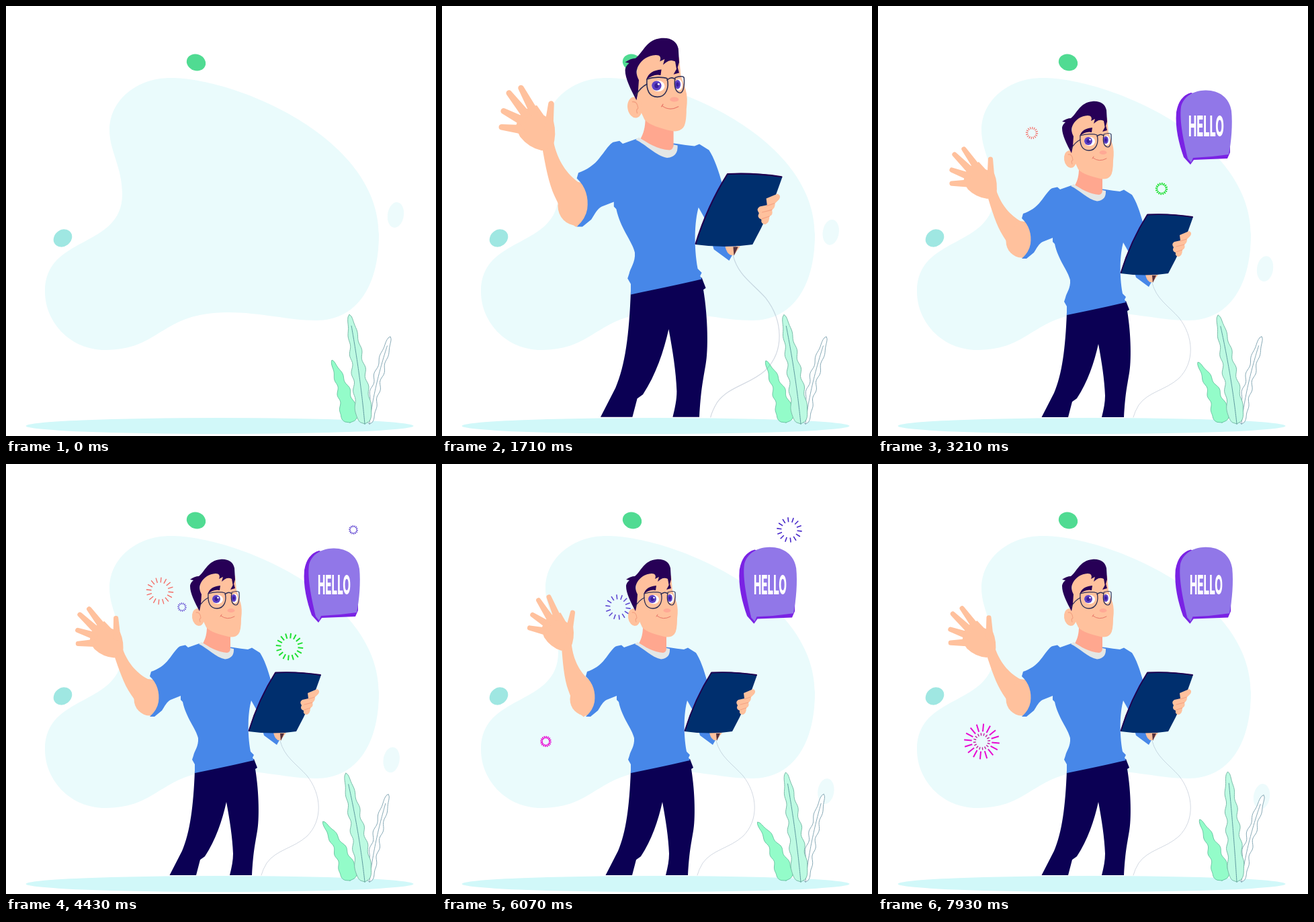
Animation, 640 px wide and 640 px high, one loop 8000 ms. Source, as an HTML page with a canvas:

```html
<!DOCTYPE html>
<html lang="en">
<head>
<meta charset="utf-8">
<title>Hello</title>
<style>
html, body { margin: 0; width: 100%; height: 100%; overflow: hidden; background: #fff; }
canvas { display: block; width: 100vw; height: 100vh; object-fit: contain; }
</style>
</head>
<body>
<canvas id="stage" width="640" height="640"></canvas>
<script>
const ctx = document.getElementById('stage').getContext('2d');
const LOOP = 8000, TAU = 2 * Math.PI;
const SKIN = '#ffc19d', BLUSH = '#ffa78f', HAIR = '#270056', SHIRT = '#4787e8', FRAME = '#2b2d55';
const IRIS = '#5c40c4', PUPIL = '#3a1f98';

const mix = (a, b, p) => a + (b - a) * p;
const easeSine = p => (1 - Math.cos(Math.PI * p)) / 2;

// Value at time t through [time, value] keys with a sine ease between them.
function track(t, keys) {
  if (t <= keys[0][0]) return keys[0][1];
  for (let i = 1; i < keys.length; i++) {
    const [t0, a] = keys[i - 1], [t1, b] = keys[i];
    if (t < t1) return mix(a, b, easeSine((t - t0) / (t1 - t0)));
  }
  return keys[keys.length - 1][1];
}

const asPath = s => typeof s === 'string' ? new Path2D(s) : s;
function fill(shape, color) { ctx.fillStyle = color; ctx.fill(asPath(shape)); }
function line(shape, color, width) {
  ctx.strokeStyle = color;
  ctx.lineWidth = width;
  ctx.stroke(asPath(shape));
}
function oval(x, y, rx, ry, color, turn = 0) {
  ctx.beginPath();
  ctx.ellipse(x, y, rx, ry, turn, 0, TAU);
  ctx.fillStyle = color;
  ctx.fill();
}
function zoom(x, y, s) { ctx.translate(x, y); ctx.scale(s, s); ctx.translate(-x, -y); }
function turn([x, y], [cx, cy], a) {
  const c = Math.cos(a), s = Math.sin(a), dx = x - cx, dy = y - cy;
  return [cx + dx * c - dy * s, cy + dx * s + dy * c];
}

function drawScene(t) {
  fill('M245 107C340 107 555 195 555 340C555 420 520 468 462 468C420 468 380 456 330 456' +
    'C230 456 230 512 148 512C95 512 58 470 58 425C58 340 173 362 173 280' +
    'C173 240 154 215 154 185C154 140 195 107 245 107Z', '#eafbfc');
  const p = track(t, [[0, 0], [7000, 1]]);
  oval(580 - 9 * p, 311 + 184 * p, 12, 19, '#edfbfc', 0.15);
  oval(283, 84, 14.4, 12.2, '#50db92', 0.35);
  oval(84.5, 345.5, 14.6, 12.2, '#9fe7e2', -0.65);
  oval(318, 625, 288.5, 12, '#d1f8f9');
}

// A leaf is a bowed spine with a tapering width and rippled edges.
const leaves = [
  { base: [541, 622], bow: [548, 562], tip: [572, 492], width: 6.2, taper: 0.15, waves: 5, color: '#ffffff',
    edge: '#86a9b6', rib: '#86a9b6', sway: [[2000, 0], [5700, -4], [9000, 4]] },
  { base: [512, 620], bow: [507, 575], tip: [485, 527], width: 12.5, taper: 0.7, waves: 4, color: '#93fcc9',
    edge: '#6cc7a4', sway: [[0, 0], [5900, -16], [9500, 0]] },
  { base: [534, 622], bow: [527, 545], tip: [511, 459], width: 12, taper: 0.5, waves: 6, color: '#bdfae2',
    edge: '#7cbcaa', rib: '#5f9ca0', sway: [[0, 0], [4000, -5.5], [9200, 12]] }
];

function halfWidth(leaf, u) {
  const foot = 0.12;
  if (u < foot) return leaf.width * Math.sqrt(1 - (1 - u / foot) ** 2);
  const v = (u - foot) / (1 - foot);
  return leaf.width * (1 - leaf.taper * v) * Math.sqrt(1 - v ** 8);
}

function drawLeaf(leaf, t) {
  const { base, waves } = leaf;
  const angle = track(t, leaf.sway) / (base[1] - leaf.tip[1]);
  const bow = turn(leaf.bow, base, angle / 2), tip = turn(leaf.tip, base, angle);
  const along = (i, u) => mix(mix(base[i], bow[i], u), mix(bow[i], tip[i], u), u);
  const slope = (i, u) => mix(bow[i] - base[i], tip[i] - bow[i], u);
  const rim = new Path2D(), rib = new Path2D(), steps = 50;
  for (const side of [-1, 1]) {
    for (let i = 0; i <= steps; i++) {
      const u = side < 0 ? i / steps : 1 - i / steps;
      const dx = slope(0, u), dy = slope(1, u), len = Math.hypot(dx, dy);
      const ripple = 1.7 * Math.sin(u * waves * TAU + side) * Math.sin(Math.PI * u);
      const w = side * halfWidth(leaf, u) + ripple;
      rim.lineTo(along(0, u) - dy / len * w, along(1, u) + dx / len * w);
      if (side < 0 && u < 0.92) rib.lineTo(along(0, u), along(1, u));
    }
  }
  rim.closePath();
  fill(rim, leaf.color);
  line(rim, leaf.edge, 1);
  if (leaf.rib) line(rib, leaf.rib, 1);
}

const bursts = [
  { x: 229, y: 189, start: 2200, speed: 0.0091, n: 16, width: 1.3, color: '#f56a64' },
  { x: 422, y: 272, start: 2200, speed: 0.0091, n: 16, width: 2, color: '#1ee032' },
  { x: 517, y: 98, start: 3500, speed: 0.0073, n: 14, width: 1.6, color: '#4526c9' },
  { x: 262, y: 213, start: 3500, speed: 0.0073, n: 14, width: 1.6, color: '#5f48d2' },
  { x: 154.5, y: 413, start: 5230, speed: 0.0098, n: 16, width: 2, color: '#e808d2', inner: '#c2189f' }
];

function rays(b, r0, r1, shift) {
  ctx.beginPath();
  for (let i = 0; i < b.n; i++) {
    const a = (i + shift) * TAU / b.n, c = Math.cos(a), s = Math.sin(a);
    ctx.moveTo(b.x + c * r0, b.y + s * r0);
    ctx.lineTo(b.x + c * r1, b.y + s * r1);
  }
  ctx.stroke();
}

function drawBursts(t) {
  const life = 3300;
  ctx.lineCap = 'butt';
  for (const b of bursts) {
    const age = t - b.start;
    if (age < 300 || age > life) continue;
    const r = age * b.speed;
    const gap = 0.62 + 0.38 * Math.max(0, (age - life + 600) / 600);
    ctx.lineWidth = b.width * Math.min(1, 0.5 + r / 24);
    ctx.strokeStyle = b.color;
    rays(b, r * (b.inner ? 0.56 : gap), r, 0.25);
    if (b.inner && r > 12) {
      ctx.strokeStyle = b.inner;
      ctx.lineWidth = 1.4;
      rays(b, r * 0.33, r * 0.48, 0.75);
    }
  }
  ctx.lineCap = 'round';
}

// Finger from a wide root to a narrow round tip.
function finger(x0, y0, x1, y1) {
  const a = Math.atan2(y1 - y0, x1 - x0), root = 5.5, end = 3.6;
  ctx.beginPath();
  ctx.arc(x0, y0, root, a + TAU / 4, a - TAU / 4);
  ctx.arc(x1, y1, end, a - TAU / 4, a + TAU / 4);
  ctx.fillStyle = SKIN;
  ctx.fill();
}

function drawArm(t) {
  const angle = track(t, [[2350, 13.2], [3900, 25], [5850, 7.3], [8100, 21.5]]);
  ctx.save();
  ctx.translate(212, 348);
  ctx.rotate((20.1 - angle) * Math.PI / 180);
  ctx.translate(-212, -348);
  fill('M162 280C170 306 176 326 186 342C196 358 206 372 217 376L232 356L226 322L212 320C198 312 184 298 176 274Z', SKIN);
  fill('M176 281Q179 264 173 249L160 243L150 232L138 238L130 248L127 262L134 273Q146 285 163 287Z', SKIN);
  finger(147, 240, 128, 213);
  finger(137, 244, 114, 221);
  finger(134, 253, 110, 244);
  finger(133, 264, 110, 264);
  finger(168, 256, 167.5, 228);
  ctx.restore();
  oval(214, 350, 23.5, 24.5, SKIN);
}

function drawBody(t) {
  line('M408 412C414 436 432 446 448 464C470 492 472 530 448 554C428 572 402 574 388 594Q382 604 380 612',
    'rgba(140,155,180,.38)', 1);
  fill('M281 456L369 439L374 452L371 454C377 490 377 530 374 546C370 570 368 578 366 612H333' +
    'C336 600 338 590 338 580C337 555 333 530 328 503C322 530 312 560 296 584L289 589L283 612H243.5' +
    'L262 576C274 548 279 510 281 456Z', '#0b0054');
  drawArm(t);
  fill('M288 267L271 273L267 269.5L260 271C255 272 248 284 242 291C236 299 226 306 216 309L214 316' +
    'C225 326 229 340 227 354Q225 366 214 376L221 376L232 367C236 361 239 354 245 351L260 345L260 351L263 354' +
    'C268 378 283 394 286 408C287 420 280 428 279 434L277 440L281 447V460Q340 448 369 441' +
    'L367 437L369 433L364 428C359 400 360 370 365 352L374 368L384 404L403 418L412 402L410 380' +
    'L395 325C390 306 384 290 378 281L366 273.5L360 276Q350 275 338 273Z', SHIRT);
  fill('M299 242C299 252 297 260 293 267C304 274 318 284 334 283L334 250Z', BLUSH);
  fill('M291 265L287 268C300 274 312 288 326 290.5Q340 289 339 275L334 274Q334 280 329 281C314 280 302 272 291 265Z',
    '#e3e7e6');
}

function drawHead() {
  fill('M289 178Q298 160 318 160L341 166L343 188L349 206Q352 216 350 230Q350 248 346 253Q341 259 331 257' +
    'C318 254 304 250 298 243L291 228L287 205Z', SKIN);
  oval(286, 228, 9, 13, SKIN, -0.15);
  line('M283 221Q289 220 290 229Q287 231 289 235', '#f3a080', 1.1);
  fill('M288 219C281 206 274 192 274 182Q274 177 279 173L274 172Q281 167 287 167C297 159 300 144 319 142' +
    'C331 141 338 146 340 155L341 172L338 182L336 171Q330 168 325 172L321 175L323 168L317 171' +
    'Q320 163 312 163C302 164 295 168 290 177C287 183 288 188 291 194L290 209Z', HAIR);
  fill('M300 194C303 185 309 182 319 181L318 188Q309 186 300 194Z', HAIR);
  fill('M334 187L339 178L341 185Z', HAIR);

  oval(315, 201.5, 8, 6.8, '#ffffff');
  oval(340.5, 200, 4.5, 7, '#ffffff');
  oval(313, 201, 6, 6, IRIS);
  oval(339, 199.5, 3.8, 5.6, IRIS);
  oval(313, 201, 2.6, 3, PUPIL);
  oval(339, 199.5, 1.8, 2.8, PUPIL);
  oval(315.5, 199, 1.3, 1.3, '#ffffff');

  line('M301 193C309 190 321 190 326 192C329 203 325 215 314 215C304 215 300 207 301 193Z', FRAME, 1.3);
  line('M336 191C341 189 346 189 347 191C348 201 346 210 342 210C337 209 334 203 336 191Z', FRAME, 1.2);
  line('M326 194Q331 189 336 193M301 199Q293 203 287 213', FRAME, 1.3);
  oval(335, 218, 5.5, 3, '#ffa995');
  line('M320 226Q329 233 340 227M319 227L321 224', '#e87868', 1);
}

function drawTablet() {
  fill('M398 400H417L409 411Q401 413 398 400Z', SKIN);
  fill('M408 401H414L409 412Z', '#54323f');
  fill('M401 310Q436 308 469 314Q455 356 432 398Q398 403 361 398Q375 350 401 310Z', '#002f6e');
  line('M361.5 397Q376 350 401 310.5Q436 309 468 314', '#21004f', 1.8);
  fill('M449 341L463 335Q468 337 465 342L460 347Q460 353 456 355Q458 361 453 363Q453 371 448 373' +
    'Q442 373 443 367Q437 365 440 359Q436 354 441 351L450 349Z', SKIN);
  line('M450 350L459 347M444 358L456 355M444 366L453 363', '#f4a283', 1);
}

function drawMan(t) {
  const start = 735, peak = 1720;
  if (t <= start) return;
  const rest = 1 - (t - start) / (peak - start);
  const s = t < peak ? 1.2 * (1 - rest ** 3.83) : track(t, [[peak, 1.2], [2600, 1]]);
  ctx.save();
  zoom(281, 613, s);
  drawBody(t);
  drawHead();
  drawTablet();
  ctx.restore();
}

function drawBubble(t) {
  if (t <= 2640) return;
  ctx.save();
  zoom(464, 237, track(t, [[2640, 0], [2920, 1.12], [3190, 1]]));
  ctx.save();
  zoom(486, 181, track(t, [[4430, 1], [6070, 1.03]]));
  fill('M466 129Q448 134 444 158C442 182 448 205 455 225L465 236L470 229L520 227L524 218V150Z', '#7a22e4');
  fill('M487 125.5C470 126 455 134 451 150C448 172 456 205 461 227L466 233L469 226Q495 225 522 221' +
    'C526 202 528 176 526 156C523 136 507 125 487 125.5Z', '#9177e8');
  ctx.restore();
  const s = track(t, [[2700, 0], [3040, 1.16], [3380, 1]]);
  if (s > 0) {
    ctx.translate(488.5, 194);
    ctx.scale(0.38 * s, s); // narrow poster lettering
    ctx.font = '800 40px Inter, "Liberation Sans", sans-serif';
    ctx.textAlign = 'center';
    ctx.fillStyle = '#fff';
    ctx.fillText('HELLO', 0, 0);
  }
  ctx.restore();
}

function draw(now) {
  const t = now % LOOP;
  ctx.fillStyle = '#fff';
  ctx.fillRect(0, 0, 640, 640);
  ctx.lineCap = ctx.lineJoin = 'round';
  drawScene(t);
  for (const leaf of leaves) drawLeaf(leaf, t);
  drawBursts(t);
  drawMan(t);
  drawBubble(t);
}

const begin = performance.now();
function tick() {
  draw(performance.now() - begin);
  requestAnimationFrame(tick);
}
tick();
</script>
</body>
</html>
```
